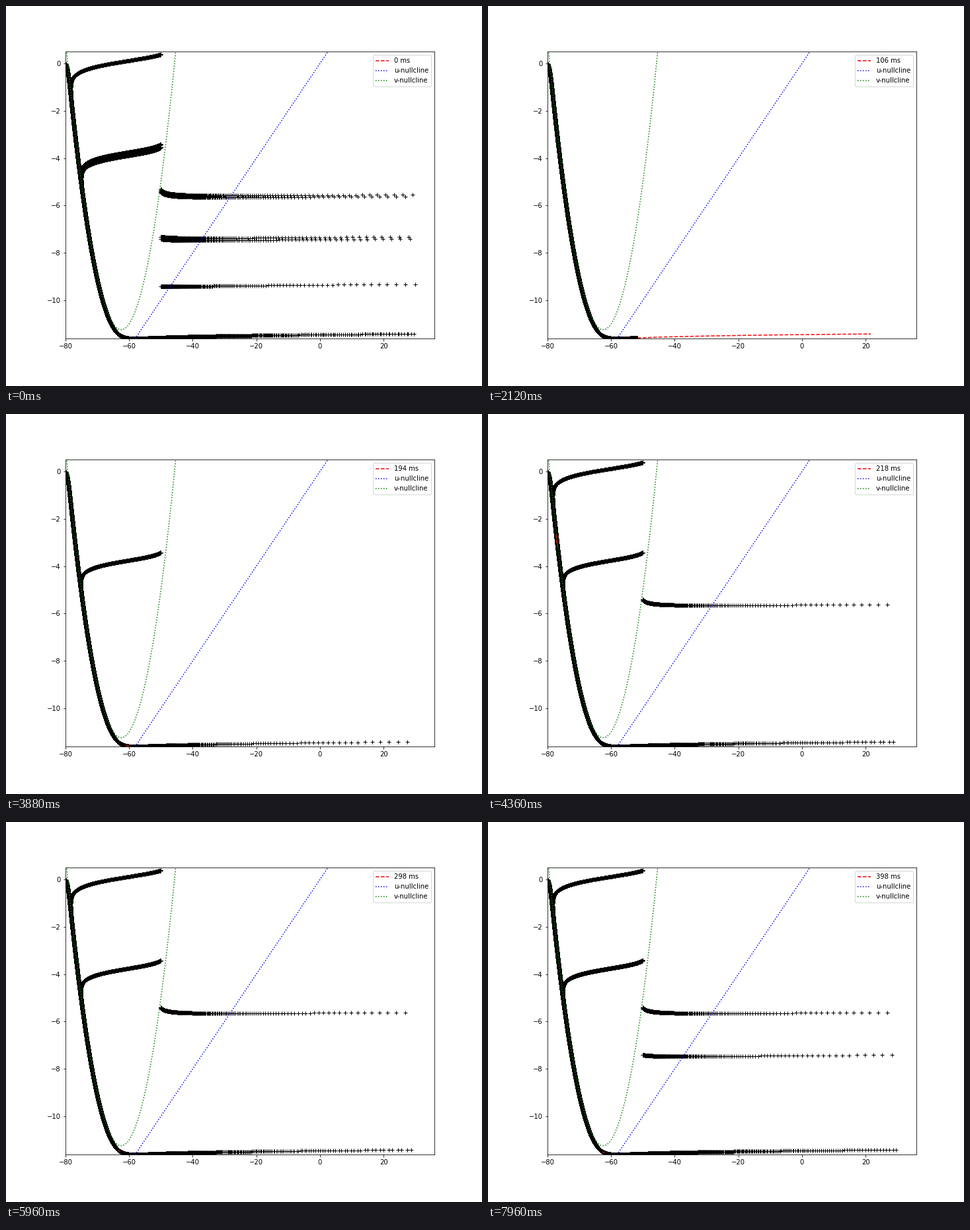
Write a matplotlib script that moves like this. It is 720x576 px and loops after 8000 ms.

```python
import numpy as np
import matplotlib.pyplot as plt
from matplotlib.animation import FuncAnimation

# Izhikevich neuron whose reset jump d shrinks over time
A, B, C, I = 0.02, 0.2, -50.0, 5.0
DT, T_END = 0.01, 500
MS_PER_FRAME = 2
FRAMES, INTERVAL = 200, 40
STEP = round(MS_PER_FRAME / DT)


def simulate():
    n = round(T_END / DT)
    v, u = np.empty(n), np.empty(n)
    x, y = -80.0, 0.0
    for k in range(n):
        v[k], u[k] = x, y
        dx = 0.04 * x * x + 5 * x + 140 - y + I
        dy = A * (B * x - y)
        x, y = x + DT * dx, y + DT * dy
        if x >= 30:
            x = C
            y += 8 - 2 * (k * DT // 125)
    return v, u


v, u = simulate()

fig, ax = plt.subplots(figsize=(10, 8), dpi=72)
fig.subplots_adjust(left=0.125, right=0.9, bottom=0.125, top=0.88)
ax.set_xlim(v.min(), 1.2 * v.max())
ax.set_ylim(u.min(), 0.5)

# Skip markers that pile up on the same pixel
pixels = np.floor(ax.transData.transform(np.column_stack([v, u])) + 0.5)
keep = np.ones(len(v), bool)
keep[5:] = (pixels[5:] != pixels[:-5]).any(axis=1)
kept = np.flatnonzero(keep)

grid = np.linspace(-80, 30, 1000)
past, = ax.plot([], [], "k+")
recent, = ax.plot([], [], "r--", label="0 ms")
ax.plot(grid, B * grid, "b:", label="u-nullcline")
ax.plot(grid, 0.04 * grid**2 + 5 * grid + 140 + I, "g:", label="v-nullcline")
legend = ax.legend(loc="upper right")
clock = legend.get_texts()[0]


def update(i):
    # The opening frame shows the whole path
    start = (i - 1) * STEP if i else len(v) - STEP
    shown = kept[:np.searchsorted(kept, start)]
    past.set_data(v[shown], u[shown])
    window = slice(start, i * STEP)
    recent.set_data(v[window], u[window])
    clock.set_text(f"{i * MS_PER_FRAME} ms")
    return past, recent, clock


anim = FuncAnimation(fig, update, frames=FRAMES, interval=INTERVAL,
                     repeat=True, repeat_delay=0)
plt.show()
```
